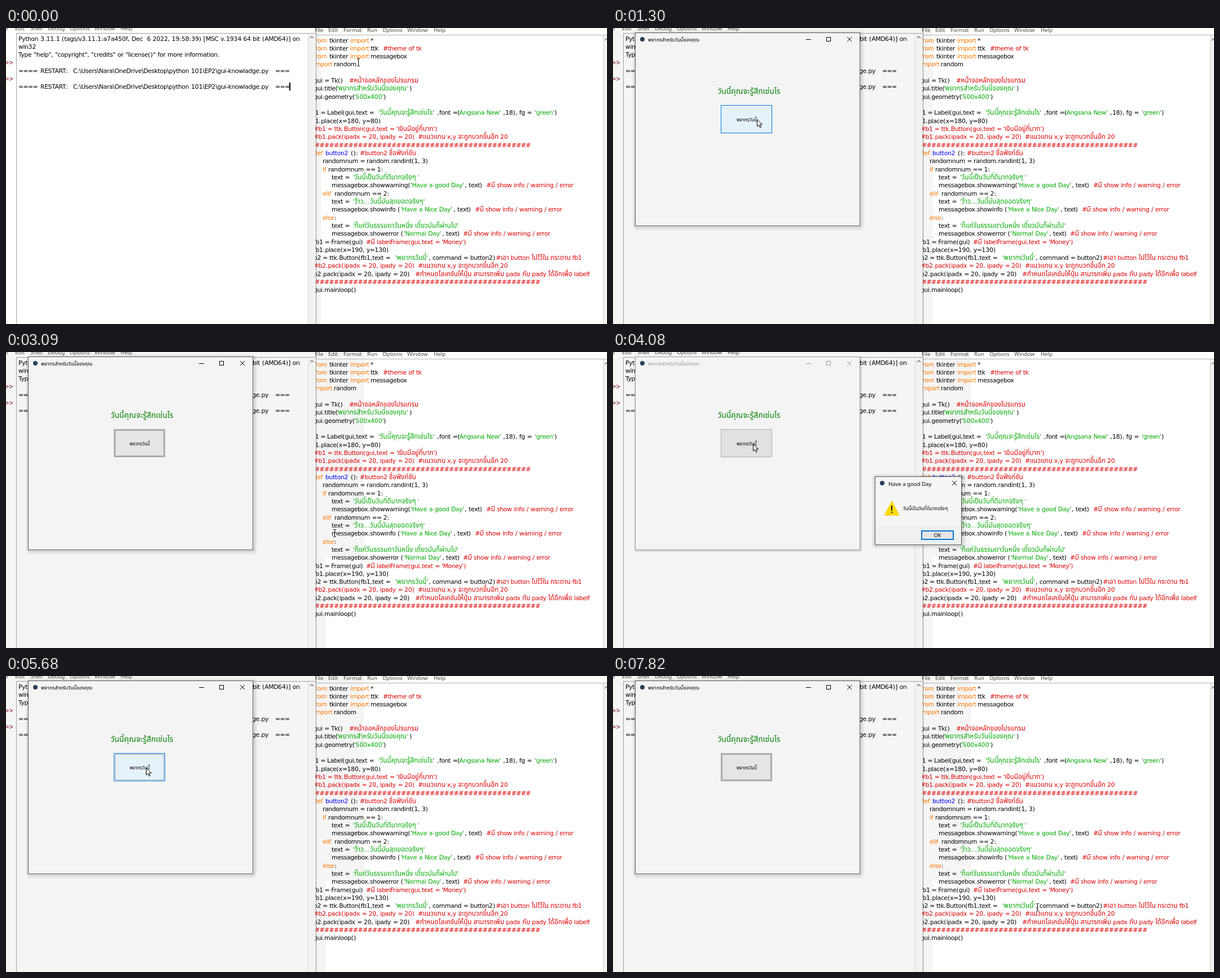
Recreate the animation shown at these times as an HTML page with a canvas. Size 1065 by 526 pixels, loop 7.99 s.

```html
<!DOCTYPE html>
<html lang="th">
<head>
<meta charset="utf-8">
<style>
html, body { margin: 0; width: 100%; height: 100%; overflow: hidden; background: #fff; }
canvas { display: block; }
</style>
</head>
<body>
<canvas id="stage" width="1065" height="526"></canvas>
<script>
const ctx = document.getElementById("stage").getContext("2d");
const LOOP = 7990, ROW = 14.32;
const FONTS = '"Noto Sans", "Noto Sans Thai Looped", "Noto Sans Thai", "Open Sans", sans-serif';
const font = (size, weight = "") => `${weight} ${size}px ${FONTS}`;
const THAI_FONT = font(11.7);
const CODE_FONT = '10.8px "DejaVu Sans", "Noto Sans", sans-serif';
const COLORS = { k: "#000", o: "#ff7700", g: "#00aa00", r: "#dd0000", b: "#0000ff" };
const TITLE = "พยากรสำหรับวันนี้ของคุณ";
const TINT = "#f5f5f5", BLUE = "#0078d7";

// Compact letter spacing of the editor font, with fixed advances for some character classes
ctx.font = CODE_FONT;
const SAMPLE = "messageboxshowwarning";
const track = (131.5 - ctx.measureText(SAMPLE).width) / SAMPLE.length;
const wordGap = 3.75 - ctx.measureText(" ").width - track;
const PARTS = /([\u0e00-\u0e7f]+|[#=]+|\d+|[()[\]]+|[.,:]+)/;
const THAI = /[\u0e00-\u0e7f]/;
const ADVANCE = [[/[#=]/, 8.5], [/\d/, 6.8], [/[()[\]]/, 4.5], [/[.,:]/, 3.7]];
const gaps = {};
for (const c of "#=0123456789()[].,:")
  gaps[c] = ADVANCE.find(([re]) => re.test(c))[1] - ctx.measureText(c).width;

// Each row: [line, x, colour + text, x, colour + text, ...]
const code = [
  [0, 545, "ofrom", 573, "ktkinter", 610, "oimport", 646, "k*"],
  [1, 545, "ofrom", 573, "ktkinter", 610, "oimport", 646, "kttk", 668, "r#theme of tk"],
  [2, 545, "ofrom", 573, "ktkinter", 610, "oimport", 646, "kmessagebox"],
  [3, 545, "oimport", 581, "krandom"],
  [5, 545, "kgui = Tk()", 608, "r#หน้าจอหลักของโปรแกรม"],
  [6, 545, "kgui.title(", 586, "g'" + TITLE + "'", 715, "k)"],
  [7, 545, "kgui.geometry(", 617, "g'500x400'", 669, "k)"],
  [9, 545, "kl1 = Label(gui,text = ", 660, "g'วันนี้คุณจะรู้สึกเช่นไร'", 764, "k,font =(", 801, "g'Angsana New'", 881, "k,18), fg = ", 937, "g'green'", 972, "k)"],
  [10, 545, "kl1.place(x=180, y=80)"],
  [11, 545, "r#b1 = ttk.Button(gui,text = 'เงินมีอยู่กี่บาท')"],
  [12, 545, "r#b1.pack(ipadx = 20, ipady = 20)", 730, "r#แนวแกน x,y จะถูกบวกขึ้นอีก 20"],
  [13, 547, "r" + "#".repeat(45)],
  [14, 545, "odef", 566, "bbutton2", 611, "k():", 627, "r#button2 ชื่อฟังก์ชัน"],
  [15, 561, "krandomnum = random.randint(1, 3)"],
  [16, 561, "oif", 571, "krandomnum == 1:"],
  [17, 577, "ktext = ", 615, "g'วันนี้เป็นวันที่ดีมากจริงๆ '"],
  [18, 577, "kmessagebox.showwarning(", 717, "g'Have a good Day'", 813, "k, text)", 851, "r#มี show info / warning / error"],
  [19, 561, "oelif", 582, "krandomnum == 2:"],
  [20, 577, "ktext = ", 615, "g'ว้าว...วันนี้มันสุดยอดจริงๆ'"],
  [21, 577, "kmessagebox.showinfo (", 699, "g'Have a Nice Day'", 793, "k, text)", 831, "r#มี show info / warning / error"],
  [22, 561, "oelse", 582, "k:"],
  [23, 577, "ktext = ", 615, "g'ก็แค่วันธรรมดาวันหนึ่ง เดี๋ยวมันก็ผ่านไป'"],
  [24, 577, "kmessagebox.showerror (", 705, "g'Normal Day'", 773, "k, text)", 810, "r#มี show info / warning / error"],
  [25, 545, "kfb1 = Frame(gui)", 638, "r#มี labelFrame(gui,text = 'Money')"],
  [26, 545, "kfb1.place(x=190, y=130)"],
  [27, 545, "kb2 = ttk.Button(fb1,text = ", 690, "g'พยากรวันนี้'", 749, "k, command = button2)", 868, "r#เอา button ไปไว้ใน กระดาน fb1"],
  [28, 545, "r#b2.pack(ipadx = 20, ipady = 20)", 730, "r#แนวแกน x,y จะถูกบวกขึ้นอีก 20"],
  [29, 545, "kb2.pack(ipadx = 20, ipady = 20)", 725, "r#กำหนดโลเคชันให้ปุ่ม สามารถเพิ่ม padx กับ pady ได้อีกเพื่อ labelf"],
  [30, 547, "r" + "#".repeat(47)],
  [31, 545, "kgui.mainloop()"]
];

function rect(x, y, w, h, fill, stroke, line = 1) {
  if (fill) { ctx.fillStyle = fill; ctx.fillRect(x, y, w, h); }
  if (stroke) {
    ctx.strokeStyle = stroke;
    ctx.lineWidth = line;
    ctx.strokeRect(x + line / 2, y + line / 2, w - line, h - line);
  }
}

function path(points, stroke, line = 1, fill, close) {
  ctx.beginPath();
  points.forEach(([x, y]) => ctx.lineTo(x, y));
  if (close) ctx.closePath();
  if (fill) { ctx.fillStyle = fill; ctx.fill(); }
  if (stroke) { ctx.strokeStyle = stroke; ctx.lineWidth = line; ctx.stroke(); }
}

function round(x, y, w, h, r, fill) {
  ctx.beginPath();
  ctx.roundRect(x, y, w, h, r);
  ctx.fillStyle = fill;
  ctx.fill();
}

function dot(x, y) {
  ctx.beginPath();
  ctx.arc(x, y, 4, 0, 7);
  ctx.fillStyle = "#27405c";
  ctx.fill();
}

function label(str, x, y, size, fill, align = "left", weight) {
  ctx.font = font(size, weight);
  ctx.letterSpacing = ctx.wordSpacing = "0px";
  ctx.textAlign = align;
  ctx.fillStyle = fill;
  ctx.fillText(str, x, y);
}

function codeText(str, x, y, fill) {
  ctx.textAlign = "left";
  ctx.fillStyle = fill;
  ctx.wordSpacing = wordGap + "px";
  for (const part of str.split(PARTS)) {
    if (!part) continue;
    const thai = THAI.test(part);
    ctx.font = thai ? THAI_FONT : CODE_FONT;
    ctx.letterSpacing = (thai ? 0 : gaps[part[0]] ?? track) + "px";
    ctx.fillText(part, x, y);
    x += ctx.measureText(part).width;
  }
}

function menu(items, y) {
  for (const [x, str] of items) label(str, x, y, 9.6, "#444");
}

function scrollArrow(x, y) {
  path([[x - 3, y + 2], [x, y - 1], [x + 3, y + 2]], "#666", 1.2);
}

function shell(active) {
  menu([[-12, "File"], [16, "Edit"], [43, "Shell"], [74, "Debug"], [113, "Options"], [157, "Window"], [203, "Help"]], 4);
  rect(18, 9, 531, 1, "#a0a0a0");
  rect(18, 9, 1, 517, "#a0a0a0");
  rect(535, 10, 1, 516, "#d8d8d8");
  rect(536, 10, 12, 516, "#f2f2f2");
  scrollArrow(542, 16);
  const line = (n, x, str) => codeText(str, x, 22.5 + n * ROW, "#000");
  line(0, 22, "Python 3.11.1 (tags/v3.11.1:a7a450f, Dec  6 2022, 19:58:39) [MSC v.1934 64 bit (AMD64)] on");
  line(1, 22, "win32");
  line(2, 22, 'Type "help", "copyright", "credits" or "license()" for more information.');
  for (const n of [4, 6]) {
    line(n, 22, "====");
    line(n, 61, "RESTART:");
    line(n, 119, "C:\\Users\\Nara\\OneDrive\\Desktop\\python 101\\EP2\\gui-knowladge.py");
    line(n, 477, "===");
    label(">>", -2, 23 + (n - 1) * ROW, 13, "#800000");
  }
  if (active) rect(502, 97, 2, 14, "#000");
  rect(549, 0, 1, 526, "#8c8c8c");
}

function editor() {
  ctx.save();
  ctx.beginPath();
  ctx.rect(548, 0, 517, 526);
  ctx.clip();
  menu([[547, "File"], [571, "Edit"], [598, "Format"], [640, "Run"], [667, "Options"], [711, "Window"], [758, "Help"]], 7);
  rect(550, 12, 515, 1, "#b0b0b0");
  rect(1059, 13, 6, 513, "#f2f2f2");
  rect(1058, 13, 1, 513, "#d0d0d0");
  scrollArrow(1064, 20);
  for (const [n, ...runs] of code)
    for (let i = 0; i < runs.length; i += 2)
      codeText(runs[i + 1].slice(1), runs[i], 25.5 + n * ROW, COLORS[runs[i + 1][0]]);
  ctx.restore();
}

function closeMark(x, y, color) {
  path([[x - 4, y - 4], [x + 4, y + 4]], color);
  path([[x - 4, y + 4], [x + 4, y - 4]], color);
}

function appWindow(active, hover, focus) {
  if (active) {
    round(35, 4, 410, 356, 9, "rgba(0,0,0,.05)");
    round(37, 7, 405, 349, 6, "rgba(0,0,0,.08)");
  } else {
    round(38, 8, 403, 347, 4, "rgba(0,0,0,.12)");
  }
  rect(39, 8, 399, 344, "#f4f4f4", active ? "#5c5c5c" : "#999");
  const ink = active ? "#000" : "#999";
  dot(52, 20);
  label(TITLE, 62, 23.5, 8.8, ink);
  rect(342, 20, 9, 1, ink);
  rect(378, 16, 8, 8, null, ink);
  closeMark(419, 20, ink);
  label("วันนี้คุณจะรู้สึกเช่นไร", 241, 117, 13.9, "#008000", "center");

  rect(191, 137, 91, 50, hover ? "#e5f1fb" : focus ? "#e5e5e5" : "#e1e1e1",
    hover ? BLUE : "#adadad", focus && !hover ? 2 : 1);
  if (focus) {
    ctx.setLineDash([1, 1]);
    rect(193, 139, 87, 46, null, "#666");
    ctx.setLineDash([]);
  }
  label("พยากรวันนี้", 237, 165.5, 8, "#000", "center", 500);
}

function dialog(hot) {
  round(459, 217, 166, 132, 7, "rgba(0,0,0,.06)");
  round(462, 220, 159, 126, 4, "rgba(0,0,0,.08)");
  rect(464, 221, 154, 122, "#f5f5f5", "#5c5c5c");
  rect(465, 308, 152, 34, "#f0f0f0");
  dot(477, 233);
  label("Have a good Day", 488, 237.5, 9.6, "#000");
  closeMark(605, 233, "#000");
  path([[494, 265], [507, 290], [481, 290]], "#f5cc00", 1, "#ffda00", true);
  rect(493, 273, 2, 9, "#111");
  rect(493, 284, 2, 2, "#111");
  label("วันนี้เป็นวันที่ดีมากจริงๆ", 514, 281, 8.5, "#000");
  rect(546, 317, 58, 17, hot ? "#e5f1fb" : "#e5e5e5", BLUE, 2);
  label("OK", 575, 329, 9, "#000", "center");
}

function arrow(x, y) {
  path([[0, 0], [0, 12.5], [3, 9.8], [5, 14.5], [7, 13.6], [5, 9], [9, 9]]
    .map(([dx, dy]) => [x + dx + .5, y + dy + .5]), "#000", 1, "#fff", true);
}

function beam(x, y) {
  x = Math.round(x); y = Math.round(y);
  rect(x, y - 6, 1, 12, "#000");
  for (const end of [y - 7, y + 6]) {
    rect(x - 2, end, 2, 1, "#000");
    rect(x + 1, end, 2, 1, "#000");
  }
}

// Screen refreshes: [first, last, count]
const ticks = [0, 1300, 7820];
for (const [a, b, n] of [[120, 1150, 8], [1570, 2520, 7], [2670, 3630, 8], [3780, 4690, 7],
  [4840, 5680, 7], [5980, 6960, 8], [7080, 7530, 4]])
  for (let i = 0; i < n; i++) ticks.push(Math.round(a + (b - a) * i / (n - 1)) - 4);
ticks.sort((a, b) => a - b);

const moves = [
  [0, 624, 61], [110, 624, 61], [1140, 255, 162], [1850, 255, 162], [2510, 575, 322],
  [2930, 578, 323], [3070, 582, 322], [3210, 582, 322], [3770, 248, 163], [4220, 248, 163],
  [4680, 578, 324], [4980, 578, 324], [5670, 248, 163], [6100, 248, 163], [6530, 603, 317],
  [6670, 591, 325], [7815, 591, 325], [7816, 752, 411], [LOOP, 752, 411]
];
const popups = [[1560, 2935], [3925, 4970], [5970, 7070]];

function pointer(t) {
  const i = moves.findIndex(m => m[0] > t);
  const [t0, x0, y0] = moves[i - 1], [t1, x1, y1] = moves[i];
  const p = (t - t0) / (t1 - t0), e = p * p * (3 - 2 * p);
  return [x0 + (x1 - x0) * e, y0 + (y1 - y0) * e];
}

const inside = (x, y, l, t, r, b) => x >= l && x <= r && y >= t && y <= b;

function draw(now) {
  const time = now % LOOP;
  const t = ticks.findLast(v => v <= time);
  const [x, y] = pointer(t);
  const opened = t > 250;
  const popup = popups.some(([a, b]) => t >= a && t < b);

  rect(0, 0, 1065, 526, "#fff");
  if (opened) rect(0, 0, 567, 526, TINT);
  else rect(550, 0, 8, 526, "#f4f4f4");
  if (t > 1560) rect(0, 0, 634, 364, TINT);
  editor();
  shell(!opened);
  if (opened) {
    const hover = !popup && inside(x, y, 191, 137, 282, 187);
    appWindow(!popup, hover, !popup && t > 1560);
  }
  if (popup) dialog(inside(x, y, 546, 317, 602, 333));

  const overWindow = opened && inside(x, y, 39, 8, 438, 352) ||
    popup && inside(x, y, 464, 221, 618, 343);
  (overWindow ? arrow : beam)(x, y);
}

function loop() {
  draw(performance.now());
  requestAnimationFrame(loop);
}
loop();
</script>
</body>
</html>
```
